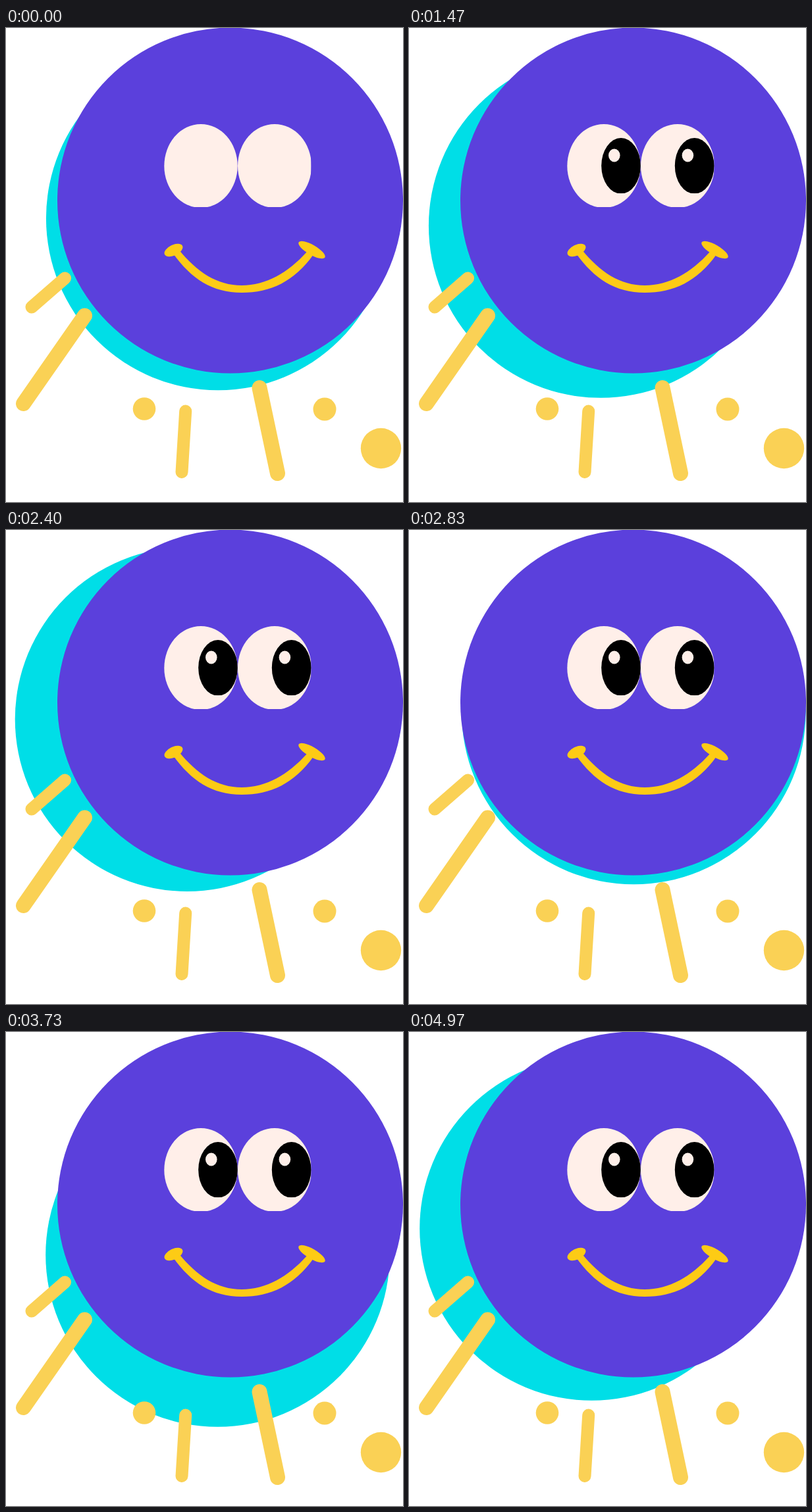
Animation of 603 by 720 pixels, one loop 5010 ms. Source, as an HTML page:

```html
<!DOCTYPE html>
<html lang="en">
<head>
<meta charset="utf-8">
<title>Smiling ball</title>
<style>
html, body { margin: 0; width: 100%; height: 100%; overflow: hidden; background: #fff; }
svg { display: block; width: 603px; height: 720px; }
</style>
</head>
<body>
<svg viewBox="0 0 603 720">
  <defs>
    <clipPath id="whiteClip"><path d="M0 0H463.3V272H0Z"/></clipPath>
    <clipPath id="pupilClip"><path d="M0 0H463.3V251.2H0Z"/></clipPath>
    <g id="pupil">
      <ellipse cx="322" cy="209.3" rx="29.8" ry="42.3" clip-path="url(#pupilClip)"/>
      <ellipse cx="311.8" cy="193.5" rx="8.8" ry="10" fill="#ffefe9"/>
    </g>
  </defs>
  <circle id="shadow" cx="340.5" cy="262" r="261.3" fill="#00dee7"/>
  <circle cx="340.5" cy="262" r="262.5" fill="#5b40dc"/>
  <g fill="#ffefe9" clip-path="url(#whiteClip)">
    <ellipse cx="296" cy="209.5" rx="55.7" ry="63.5"/>
    <ellipse cx="408" cy="209.5" rx="56" ry="63.5"/>
  </g>
  <g id="pupils">
    <use href="#pupil"/>
    <use href="#pupil" x="111.6"/>
  </g>
  <g fill="#fdcb15">
    <path d="M252 340C280 380 312 402 358 402C402 402 438 385 467 344L457 340C428 372 395 391 358 391C321 391 290 371 262 336Z"/>
    <ellipse cx="254.5" cy="337.5" rx="15" ry="8" transform="rotate(-26 254.5 337.5)"/>
    <ellipse cx="464.5" cy="337" rx="23" ry="7.5" transform="rotate(30 464.5 337)"/>
  </g>
  <g stroke="#fad155" stroke-linecap="round">
    <path d="M89.5 380L39 424M272.7 582L267 674.5" stroke-width="19"/>
    <path d="M119.5 437L26.5 570.5M385 546.5L412.5 676.5" stroke-width="23"/>
  </g>
  <g fill="#fad155">
    <circle cx="210" cy="578.5" r="17.3"/>
    <circle cx="484" cy="579" r="17.5"/>
    <circle cx="569.5" cy="638.5" r="30.7"/>
  </g>
</svg>
<script>
const LOOP = 5010, FPS = 30, FADE = 400;
const shadow = document.getElementById('shadow');
const pupils = document.getElementById('pupils');

// Turning points of the shadow's swing: time, x, y
const turns = [
  [0, -18.3, 27], [300, -43, 0], [770, -33, 45], [1200, 30, -20],
  [1470, -49.3, 38.5], [2000, 44, -21], [2340, -68, 26], [2830, 0.8, 15],
  [3300, -50, 4], [3730, -19, 76.5], [4060, 50, 30], [4430, 28, -20],
  [4970, -63, 36.5]
];

function offset(t) {
  const next = Math.max(1, turns.findIndex(turn => turn[0] >= t));
  const [t0, x0, y0] = turns[next - 1], [t1, x1, y1] = turns[next];
  const ease = (1 - Math.cos(Math.PI * (t - t0) / (t1 - t0))) / 2;
  return [x0 + (x1 - x0) * ease, y0 + (y1 - y0) * ease];
}

function draw() {
  const frame = Math.floor(performance.now() % LOOP * FPS / 1000 + 0.11);
  const t = Math.min(4970, Math.round(frame * 100 / FPS) * 10);
  shadow.setAttribute('transform', `translate(${offset(t)})`);
  pupils.setAttribute('opacity', Math.min(1, t / FADE));
  requestAnimationFrame(draw);
}
draw();
</script>
</body>
</html>
```
